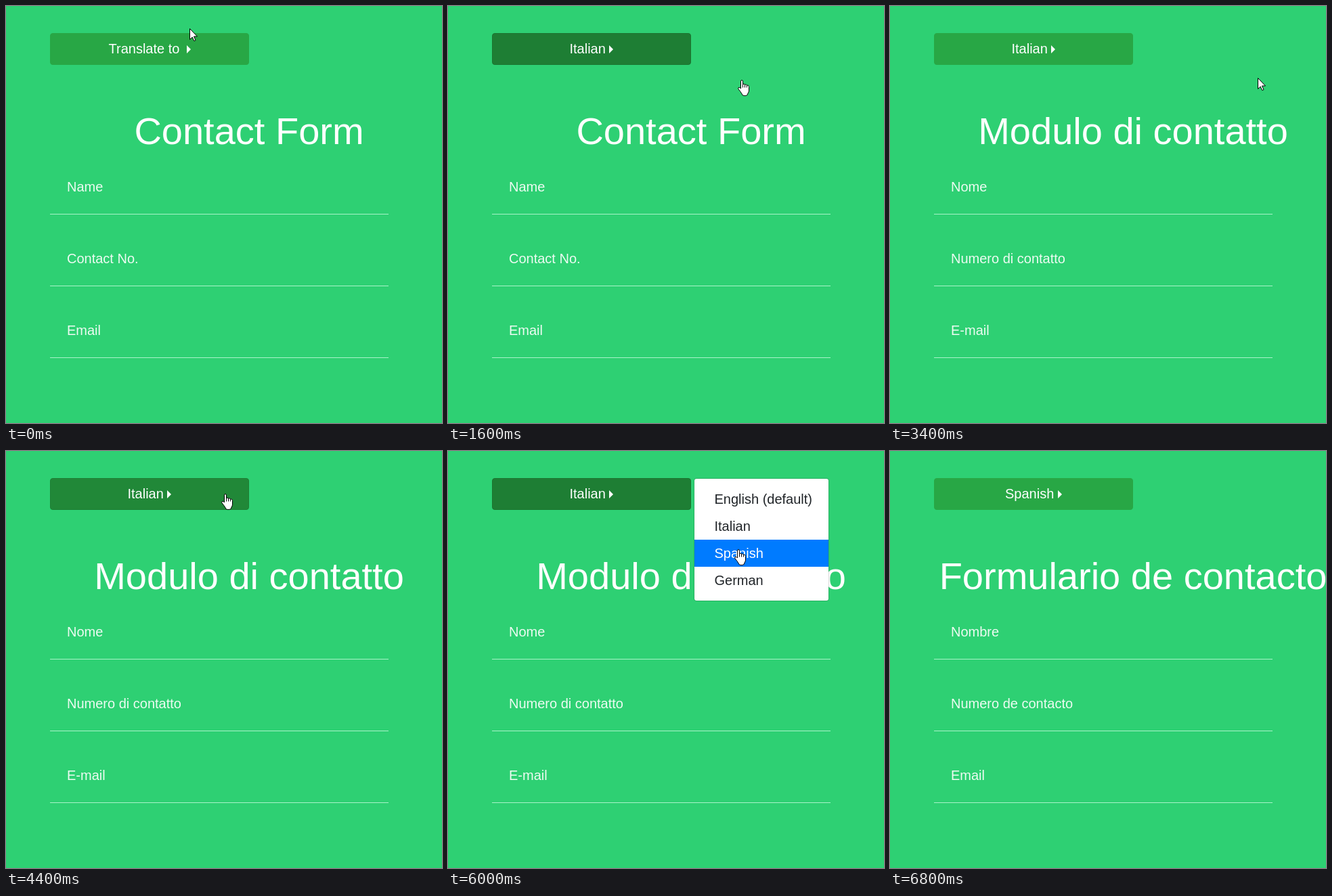
An HTML page that plays this animation: 644x616 px, repeating every 8000 ms.

```html
<!DOCTYPE html>
<html lang="en">
<head>
<meta charset="utf-8">
<title>Contact form</title>
<style>
  html, body { margin: 0; width: 100%; height: 100%; overflow: hidden; background: #2ed073; }
  svg { display: block; width: 644px; height: 616px; font: 20px "Liberation Sans", Arial, sans-serif; fill: #fff; }
  #title { font-size: 56px; text-anchor: middle; }
  .label { fill: #edfbf2; }
  .line { fill: #a7f3c8; }
  #ring { fill: #48b461; opacity: .5; }
  #frame { fill: none; stroke: #000; stroke-opacity: .15; }
  .item { fill: #212529; }
  .item.on { fill: #fff; }
  #bar { fill: #007bff; }
  .cursor { fill: #fff; stroke: #000; stroke-linejoin: round; }
</style>
</head>
<body>
<svg viewBox="0 0 644 616">
  <rect id="ring" x="62" y="37" width="300" height="53" rx="6"/>
  <rect id="button" x="65.5" y="40.5" width="293" height="46" rx="3.5"/>
  <text id="choice" y="70"/>
  <path id="caret" d="M0 58l6 6l-6 6z"/>
  <text id="title" x="359" y="204"/>
  <g id="form"></g>
  <g id="menu">
    <rect x="364" y="41" width="198" height="180" rx="3"/>
    <rect id="frame" x="363.5" y="40.5" width="199" height="181" rx="3.5"/>
    <rect id="bar" x="364" width="198" height="40"/>
  </g>
  <path id="arrow" class="cursor" d="M.5 .5V16.5L4.2 13L6.8 18.6L9 17.6L6.5 12H11.5Z"/>
  <path id="hand" class="cursor" d="M4.5 13V2.2Q4.5 .6 6 .6T7.5 2.2V6.5Q9.2 5.6 10.5 7Q12.3 6.3 13.4 7.9Q16.5 7.5 16.5 10.5V16Q16.5 18 15 20Q14.6 23.4 12 23.4H9Q6.8 23.4 6.2 21Q4.5 18 1 13.8Q0 11.5 2 11.2Q3.2 11.3 4.5 13M7.5 6.5V11.5M10.5 7V11.5M13.4 8V11.5"/>
</svg>
<script>
const $ = id => document.getElementById(id);
const add = (parent, tag, attrs, text = "") => {
  const el = document.createElementNS("http://www.w3.org/2000/svg", tag);
  for (const key in attrs) el.setAttribute(key, attrs[key]);
  el.textContent = text;
  return parent.appendChild(el);
};
const show = (el, on) => el.setAttribute("visibility", on ? "visible" : "hidden");

const LOOP = 8000;
const FILL = { idle: ["#28a745", "#28a745"], hover: ["#218838", "#1e7e34"], active: ["#1e7e34", "#1c7430"] };
const CHOICES = [["Translate to", 151.5, 267], ["Italian", 179.5, 238], ["Spanish", 170, 248]];
const FORMS = [
  ["Contact Form", "Name", "Contact No.", "Email"],
  ["Modulo di contatto", "Nome", "Numero di contatto", "E-mail"],
  ["Formulario de contacto", "Nombre", "Numero de contacto", "Email"]
];

// start time, cursor, x, y, button look, menu (-1 closed, 0 open, n = highlighted row), focus ring
const STEPS = [
  [0, "arrow", 271, 33, "idle", -1, 0],
  [200, "hand", 263, 50, "hover", -1, 0],
  [400, "hand", 251, 67, "hover", -1, 0],
  [600, "hand", 251, 67, "active", 0, 1],
  [800, "hand", 268, 70, "active", 0, 1],
  [1000, "hand", 335, 88, "active", 0, 1],
  [1200, "hand", 410, 106, "active", 2, 1],
  [1400, "hand", 428, 109, "active", 2, 0],
  [1600, "hand", 428, 109, "active", -1, 0],
  [1800, "arrow", 440, 109, "idle", -1, 0],
  [2000, "arrow", 485, 108, "idle", -1, 0],
  [2200, "arrow", 526, 107, "idle", -1, 0],
  [2400, "arrow", 543, 106, "idle", -1, 0],
  [4200, "arrow", 460, 92, "idle", -1, 0],
  [4400, "hand", 318, 63, "hover", -1, 0],
  [4600, "hand", 272, 56, "hover", -1, 0],
  [5000, "hand", 272, 56, "active", 0, 1],
  [5400, "hand", 290, 66, "active", 0, 1],
  [5600, "hand", 352, 102, "active", 0, 1],
  [5800, "hand", 412, 138, "active", 3, 1],
  [6000, "hand", 423, 145, "active", 3, 0],
  [6200, "arrow", 500, 136, "active", -1, 0],
  [6400, "arrow", 634, 111, "idle", -1, 0],
  [6600, "none", 0, 0, "idle", -1, 0]
];

const labels = [0, 106, 212].map(dy => {
  add($("form"), "rect", { class: "line", x: 65, y: 307 + dy, width: 500, height: 1 });
  return add($("form"), "text", { class: "label", x: 90, y: 274 + dy });
});
const items = ["English (default)", "Italian", "Spanish", "German"].map((name, i) =>
  add($("menu"), "text", { class: "item", x: 393.5, y: 78 + 40 * i }, name));

function draw(now) {
  const t = now % LOOP;
  const [, cursor, x, y, look, row, focus] = STEPS.findLast(s => s[0] <= t);

  const [name, textX, caretX] = CHOICES[t < 1600 ? 0 : t < 6200 ? 1 : 2];
  $("choice").textContent = name;
  $("choice").setAttribute("x", textX);
  $("caret").setAttribute("transform", `translate(${caretX})`);
  $("button").setAttribute("fill", FILL[look][0]);
  $("button").setAttribute("stroke", FILL[look][1]);
  show($("ring"), focus);

  const [title, ...texts] = FORMS[t < 3400 ? 0 : t < 6800 ? 1 : 2];
  $("title").textContent = title;
  labels.forEach((el, i) => el.textContent = texts[i]);

  show($("menu"), row >= 0);
  show($("bar"), row > 0);
  $("bar").setAttribute("y", 11 + 40 * row);
  items.forEach((el, i) => el.classList.toggle("on", i + 1 === row));

  for (const kind of ["arrow", "hand"]) {
    show($(kind), kind === cursor);
    $(kind).setAttribute("transform", `translate(${x} ${y})`);
  }
}

const start = performance.now();
(function tick() {
  draw(performance.now() - start);
  requestAnimationFrame(tick);
})();
</script>
</body>
</html>
```
